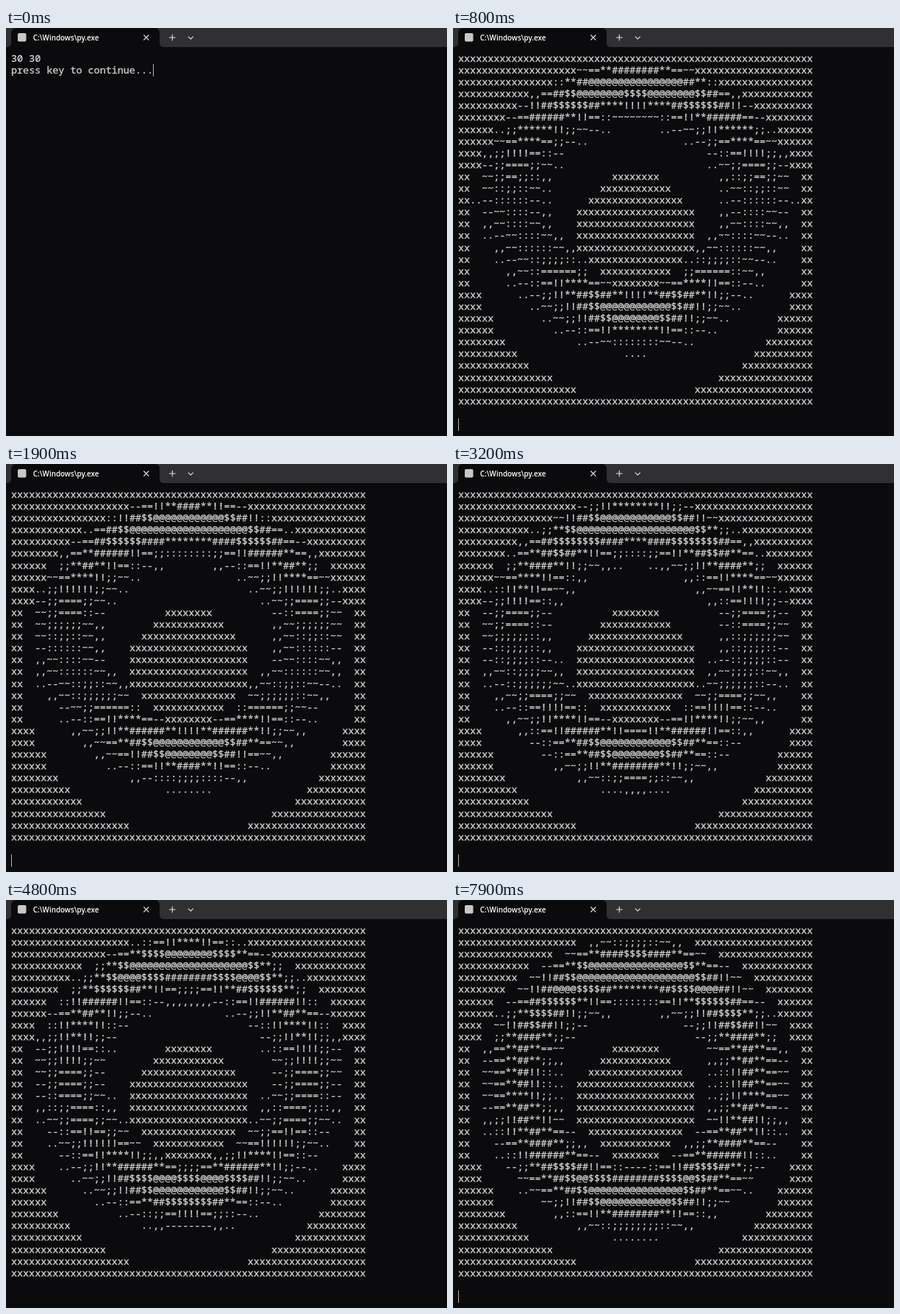
An HTML page that plays this animation: 600 px wide and 556 px high, repeating every 8000 ms.

```html
<!DOCTYPE html>
<html lang="en">
<head>
<meta charset="utf-8">
<title>Torus in a terminal</title>
<style>
  html, body { margin: 0; width: 100%; height: 100%; overflow: hidden; background: #0b0a0c; }
  #stage { position: relative; width: 600px; height: 556px; overflow: hidden; background: #0b0a0c; }
  #bar { position: absolute; left: 0; top: 0; }
  #bar text { font: 600 9.85px "Open Sans", "Noto Sans", sans-serif; fill: #fff; }
  #screen {
    position: absolute; left: 7px; top: 32.8px; margin: 0;
    font: 500 13.416px/16.1px "Noto Sans Mono", "DejaVu Sans Mono", monospace;
    font-variant-ligatures: none; color: #d4d4d4; white-space: pre;
    -webkit-text-stroke: 0.3px #d4d4d4;
    transform: rotate(0.003deg); /* keeps baselines from snapping to whole pixels */
  }
  #cursor { position: absolute; width: 1px; height: 17px; background: #b4b4b4; }
</style>
</head>
<body>
<div id="stage">
  <svg id="bar" width="600" height="27" viewBox="0 0 600 27">
    <rect width="600" height="26" fill="#302f31"/>
    <path d="M1 26q6 0 6-6V7q0-7 7-7H202q7 0 7 7V20q0 6 6 6z" fill="#0b0a0c"/>
    <rect x="16" y="7" width="11.5" height="11.5" rx="2" fill="#c8c8c8"/>
    <text x="36.8" y="16.6">C:\Windows\py.exe</text>
    <path d="M187.3 9.5l7 7m0-7l-7 7M222 13h8.6M226.3 8.7v8.6M247.8 11.6l3.5 3.3 3.5-3.3"
          fill="none" stroke="#e4e4e4" stroke-width="1.1"/>
  </svg>
  <pre id="screen"></pre>
  <div id="cursor"></div>
</div>
<script>
const LOOP = 8000, STEP = 100, SIZE = 30;
const SHADES = ".,-~:;=!*#$@";
const MID = (SIZE - 1) / 2;
const RING = MID * 2 / 3, TUBE = MID / 3;
// Light elevation: [seconds, degrees away from the viewing axis]
const LIGHT = [[0.1, 71.5], [0.8, 69.6], [1.9, 66.6], [3.2, 63.2], [4.8, 57.3], [6.2, 52.5], [7.9, 41.2]];

const screen = document.getElementById("screen");
const cursor = document.getElementById("cursor");

function lightAngle(sec) {
  let i = 1;
  while (i < LIGHT.length - 1 && sec > LIGHT[i][0]) i++;
  const [t0, a0] = LIGHT[i - 1], [t1, a1] = LIGHT[i];
  return (a0 + (a1 - a0) * (sec - t0) / (t1 - t0)) * Math.PI / 180;
}

// Torus seen along its axis, shaded by the light's mirror reflection
function cell(col, row, ly, lz) {
  const x = col - MID, y = MID - row;
  const rho = Math.hypot(x, y), s = (rho - RING) / TUBE;
  if (Math.abs(s) >= 1) return "x";
  const nz = Math.sqrt(1 - s * s), ny = s * y / rho;
  const glow = 2 * (ny * ly + nz * lz) * nz - lz;
  return glow <= 0 ? " " : SHADES[Math.min(11, Math.floor(glow * 12))];
}

function torus(sec) {
  const a = lightAngle(sec), ly = Math.sin(a), lz = Math.cos(a);
  let out = "";
  for (let row = 0; row < SIZE; row++) {
    for (let col = 0; col < SIZE; col++) out += cell(col, row, ly, lz).repeat(2);
    out += "\n";
  }
  return out;
}

function placeCursor(x, y, on) {
  cursor.style.left = x + "px";
  cursor.style.top = y + "px";
  cursor.style.visibility = on ? "visible" : "hidden";
}

let shown = -1;
function draw() {
  const t = Math.floor(performance.now() % LOOP / STEP) * STEP;
  if (t !== shown) {
    shown = t;
    if (t < STEP) {
      screen.textContent = "30 30\npress key to continue...";
      placeCursor(200, 49, true);
    } else {
      screen.textContent = torus(t / 1000);
      placeCursor(7, 532, (t + 645) % 1140 < 570);
    }
  }
  requestAnimationFrame(draw);
}
draw();
</script>
</body>
</html>
```
